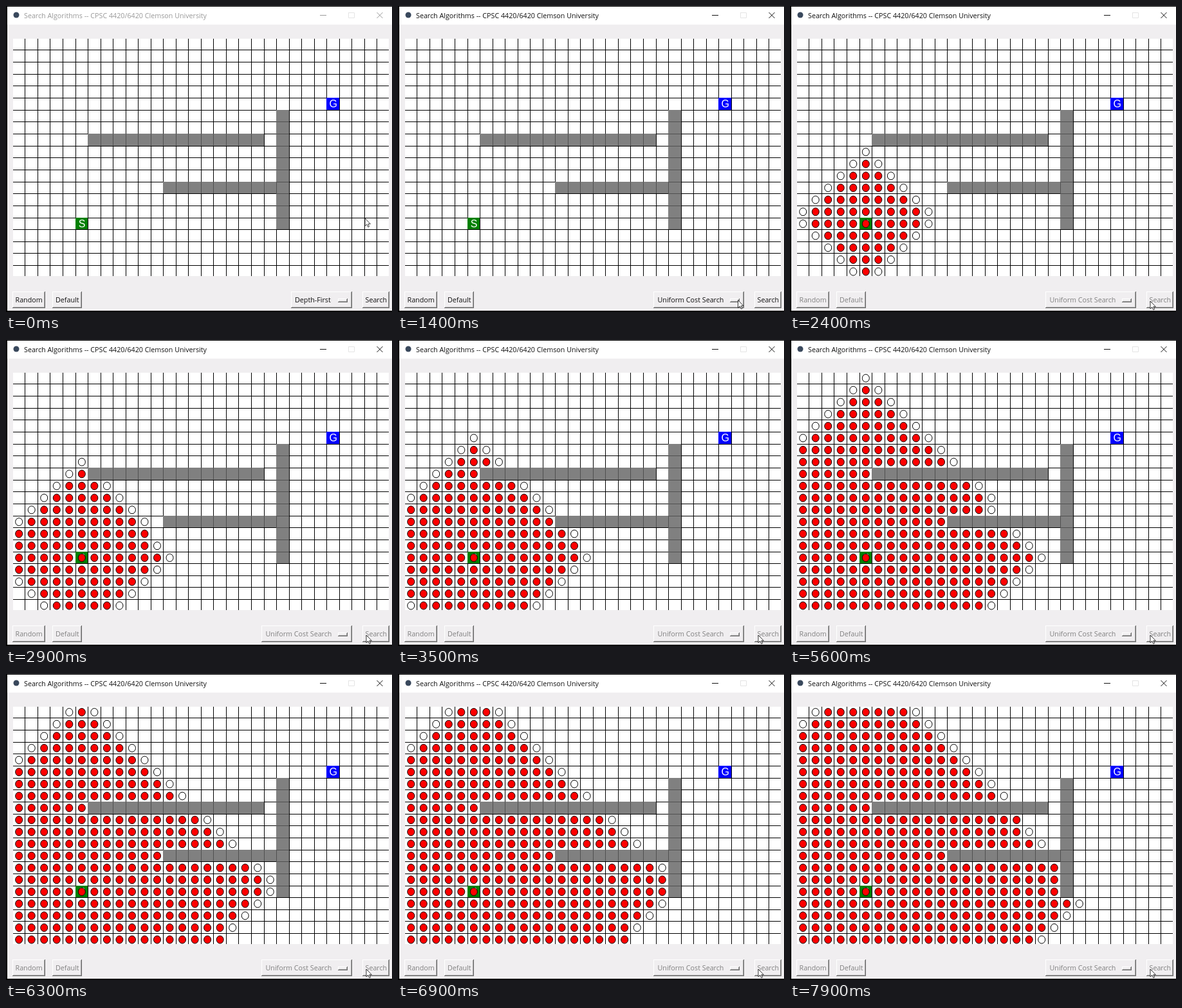
An HTML page with a canvas for the animation above (8 s loop, 600 px wide and 477 px high).

```html
<!DOCTYPE html>
<html lang="en">
<head>
<meta charset="utf-8">
<title>Search Algorithms</title>
<style>
html, body { margin: 0; width: 600px; height: 477px; overflow: hidden; }
canvas { display: block; }
</style>
</head>
<body>
<canvas id="stage" width="600" height="477"></canvas>
<script>
const ctx = document.getElementById('stage').getContext('2d');
const LOOP = 8000, STEP = 100;
const COLS = 30, ROWS = 20, X0 = 10.4, Y0 = 50.1, CW = 19.53, CH = 18.66;
const START = [5, 15], GOAL = [25, 5];
const UI = '10.73px "Open Sans", "Noto Sans", sans-serif';
const FACE = '#f0eef0';
const FOCUS = 700, PICK = 1200, SEARCH = 1900;

// time, number of expanded cells; a half means a cell is marked but not yet expanded
const PROGRESS = [[SEARCH, 0], [2150, 26], [2400, 50], [2950, 95], [3500, 131.5],
  [4400, 178], [5600, 230], [6900, 279.5], [7900, 314.5], [8000, 318]];
const MOUSE = [[0, 558, 331], [150, 558, 331], [650, 515, 455], [1250, 515, 458], [1750, 560, 460]];

const colX = c => Math.floor(X0 + c * CW);
const rowY = r => Math.floor(Y0 + r * CH);
const midX = c => X0 + (c + 0.5) * CW;
const midY = r => Y0 + (r + 0.5) * CH;

const isWall = (c, r) =>
  (r === 8 && c >= 6 && c <= 19) ||
  (r === 12 && c >= 12 && c <= 20) ||
  (c === 21 && r >= 6 && r <= 15);

// Unit costs: the frontier is a queue, neighbours taken up, down, left, right.
function explore() {
  const queue = [{ c: START[0], r: START[1], by: -1 }];
  const seen = new Set([START.join()]);
  for (let i = 0; i < queue.length; i++) {
    for (const [dc, dr] of [[0, -1], [0, 1], [-1, 0], [1, 0]]) {
      const c = queue[i].c + dc, r = queue[i].r + dr, key = c + ',' + r;
      if (c < 0 || r < 0 || c >= COLS || r >= ROWS || isWall(c, r) || seen.has(key)) continue;
      seen.add(key);
      queue.push({ c, r, by: i });
    }
  }
  return queue;
}
const cells = explore();

function along(points, t) {
  if (t <= points[0][0]) return points[0].slice(1);
  for (let i = 1; i < points.length; i++) {
    const a = points[i - 1], b = points[i];
    if (t <= b[0]) {
      const k = (t - a[0]) / (b[0] - a[0]);
      return a.slice(1).map((v, j) => v + (b[j + 1] - v) * k);
    }
  }
  return points[points.length - 1].slice(1);
}

function rect(color, x, y, w, h) {
  ctx.fillStyle = color;
  ctx.fillRect(x, y, w, h);
}

function text(str, x, y, color, font = UI, align = 'left') {
  ctx.font = font;
  ctx.fillStyle = color;
  ctx.textAlign = align;
  ctx.fillText(str, x, y);
}

function line(color, ...pts) {
  ctx.strokeStyle = color;
  ctx.lineWidth = 1;
  ctx.beginPath();
  for (let i = 0; i < pts.length; i += 2) ctx.lineTo(pts[i], pts[i + 1]);
  ctx.stroke();
}

function raised(x, y, w, h) {
  rect('#696969', x, y, w, h);
  rect('#ffffff', x, y, w - 1, h - 1);
  rect('#a0a0a0', x + 1, y + 1, w - 2, h - 2);
  rect(FACE, x + 1, y + 1, w - 3, h - 3);
}

function button(label, x, w, textX, color) {
  raised(x, 445, w, 26);
  text(label, textX, 462, color);
}

function titleBar(active) {
  const ink = active ? '#111' : '#999';
  rect('#fff', 2, 1, 598, 28);
  ctx.fillStyle = '#39485c';
  ctx.beginPath();
  ctx.arc(16, 14, 4.5, 0, 7);
  ctx.fill();
  text('Search Algorithms -- CPSC 4420/6420 Clemson University', 28, 19, ink);
  line(ink, 488, 14.5, 498, 14.5);
  line('#e4e4e4', 532.5, 10.5, 541.5, 10.5, 541.5, 18.5, 532.5, 18.5, 532.5, 10);
  line(ink, 576.5, 10, 585.5, 19);
  line(ink, 585.5, 10, 576.5, 19);
}

function block(color, c, r) {
  rect(color, colX(c), rowY(r), colX(c + 1) - colX(c), rowY(r + 1) - rowY(r));
}

function letter(str, [c, r], color) {
  block(color, c, r);
  text(str, midX(c) + 0.2, midY(r) + 5.7, '#fff',
    '16px "Liberation Sans", Arial, sans-serif', 'center');
}

function disc(c, r, fill) {
  ctx.beginPath();
  ctx.ellipse(midX(c), midY(r) + 0.1, 5.5, 6, 0, 0, 7);
  ctx.fillStyle = fill;
  ctx.fill();
  ctx.strokeStyle = '#000';
  ctx.lineWidth = 1;
  ctx.stroke();
}

function board(t) {
  ctx.save();
  ctx.beginPath();
  ctx.rect(11, 51, 584, 370);
  ctx.clip();
  rect('#fff', 11, 51, 584, 370);
  for (let c = 1; c < COLS; c++) rect('#000', colX(c), 51, 1, 370);
  for (let r = 1; r < ROWS; r++) rect('#000', 11, rowY(r), 584, 1);
  for (let c = 0; c < COLS; c++) {
    for (let r = 0; r < ROWS; r++) {
      if (!isWall(c, r)) continue;
      block('#808080', c, r);
      if (isWall(c - 1, r)) rect('#505050', colX(c), rowY(r), 1, rowY(r + 1) - rowY(r));
      if (isWall(c, r - 1)) rect('#505050', colX(c), rowY(r), colX(c + 1) - colX(c), 1);
    }
  }
  letter('S', START, '#008000');
  letter('G', GOAL, '#0000ff');
  if (t >= SEARCH) {
    const [n] = along(PROGRESS, t);
    const done = Math.floor(n + 1e-6), marked = Math.floor(n + 0.5 + 1e-6);
    cells.forEach(({ c, r, by }, i) => {
      if (i < marked) disc(c, r, '#ff0000');
      else if (by < done) disc(c, r, '#fff');
    });
  }
  ctx.restore();
}

function controls(t) {
  const ink = t >= SEARCH ? '#808080' : '#111';
  button('Random', 10, 51, 14.5, ink);
  button('Default', 72, 46, 77, ink);
  if (t < PICK) button('Depth-First', 443, 95, 449, ink);
  else button('Uniform Cost Search', 397, 141, 403.5, ink);
  raised(516, 456, 15, 6);
  button('Search', 554, 42, 558.5, ink);
}

function cursor(x, y) {
  const shape = [0, 0, 0, 12, 2.8, 9.4, 4.8, 13.6, 6.6, 12.8, 4.8, 8.8, 8.4, 8.8];
  ctx.beginPath();
  for (let i = 0; i < shape.length; i += 2) ctx.lineTo(x + shape[i], y + shape[i + 1]);
  ctx.closePath();
  ctx.fillStyle = '#fff';
  ctx.fill();
  ctx.strokeStyle = '#222';
  ctx.lineWidth = 0.9;
  ctx.stroke();
}

function draw(t) {
  rect('#000', 0, 0, 600, 477);
  rect(FACE, 2, 1, 598, 474);
  titleBar(t >= FOCUS);
  board(t);
  controls(t);
  cursor(...along(MOUSE, t));
}

const began = performance.now();
function tick() {
  const t = (performance.now() - began) % LOOP;
  draw(Math.floor(t / STEP) * STEP);
  requestAnimationFrame(tick);
}
tick();
</script>
</body>
</html>
```
